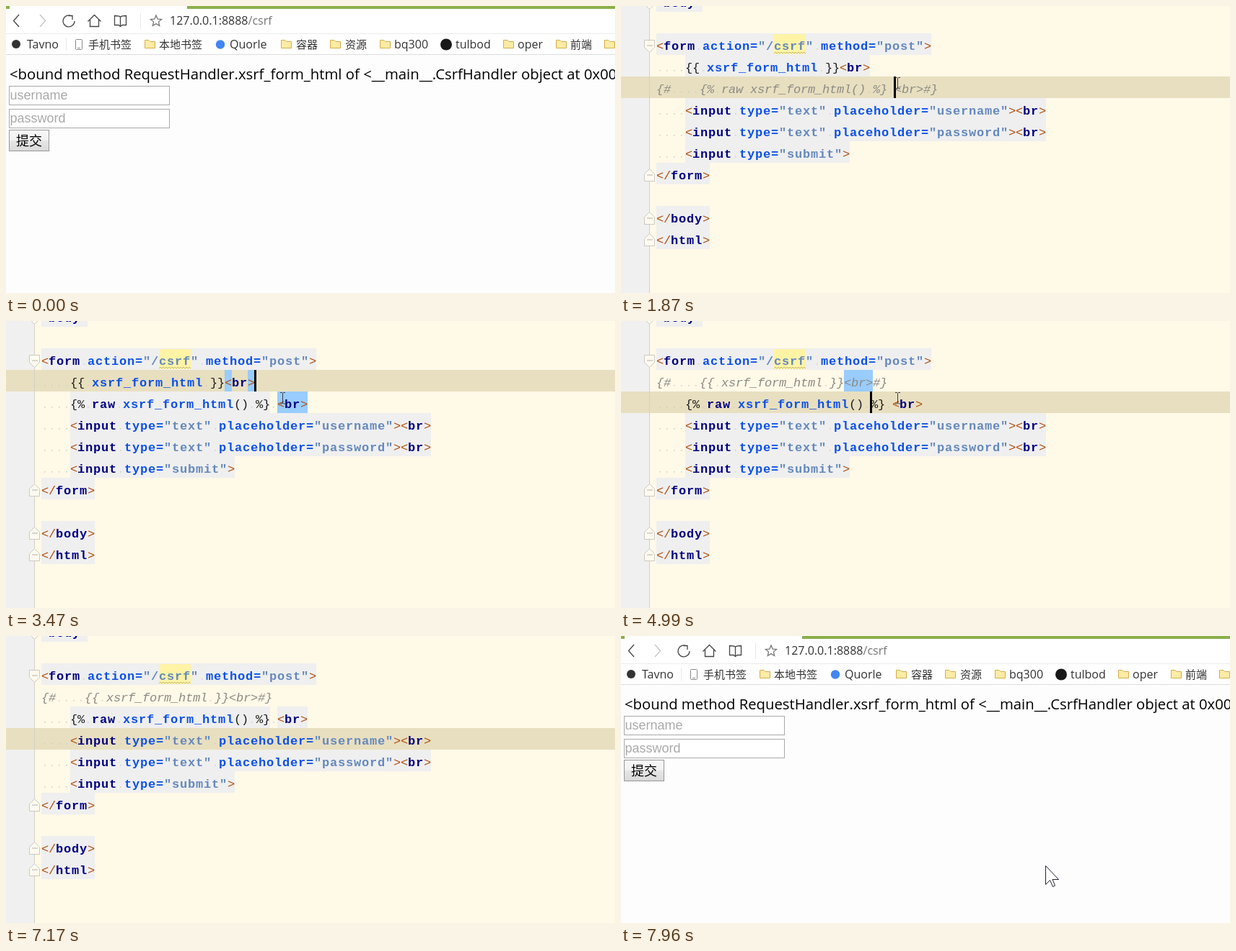
These frames come from a looping animation (844 px wide and 399 px high, 8000 ms). An HTML page:

```html
<!DOCTYPE html>
<html lang="zh">
<head>
<meta charset="utf-8">
<title>CSRF form</title>
<style>
  html, body { margin: 0; width: 100%; height: 100%; overflow: hidden; background: #fdfdfd; }
  svg { display: block; width: 844px; height: 399px; }
  text { white-space: pre; }
  .code { font: 17px "Liberation Mono", monospace; letter-spacing: -.2px; }
  .bold { font-weight: 700; letter-spacing: .8px; }
  .note { font-style: italic; }
  .ui { font: 16px "Open Sans", "Noto Sans CJK SC", "Noto Sans CJK", sans-serif; fill: #333; }
  .cjk { font: 15px "Noto Sans CJK SC", "Noto Sans CJK", sans-serif; fill: #333; }
  .page { font: 20.3px "Open Sans", sans-serif; }
  .hint { font: 18px "Liberation Sans", sans-serif; fill: #a9a9a9; }
  .icon { fill: none; stroke: #444; stroke-width: 1.3; }
</style>
</head>
<body>
<svg id="stage" viewBox="0 0 844 399">
  <defs>
    <linearGradient id="button" x2="0" y2="1">
      <stop offset="0" stop-color="#f8f8f8"/><stop offset=".48" stop-color="#f1f1f1"/>
      <stop offset=".5" stop-color="#e6e6e6"/><stop offset="1" stop-color="#dadada"/>
    </linearGradient>
  </defs>
</svg>
<script>
const LOOP = 8000, ROW = 30, LEFT = 49, TOP = 38;
const stage = document.getElementById('stage');

function add(parent, name, attrs = {}, content = '') {
  const el = document.createElementNS('http://www.w3.org/2000/svg', name);
  for (const key in attrs) el.setAttribute(key, attrs[key]);
  el.textContent = content;
  return parent.appendChild(el);
}
const group = parent => add(parent, 'g');
const rect = (parent, x, y, width, height, fill, more) =>
  add(parent, 'rect', { x, y, width, height, fill, ...more });
const path = (parent, d, more) => add(parent, 'path', { d, ...more });
const label = (parent, x, y, style, content, more) =>
  add(parent, 'text', { x, y, class: style, ...more }, content);
const dot = (parent, cx, cy, r, fill) => add(parent, 'circle', { cx, cy, r, fill });

// Hard steps: each [time, styles] holds until the next one.
function hold(el, table) {
  const frames = table.map(([time, style]) => ({ offset: time / LOOP, easing: 'steps(1)', ...style }));
  frames.push({ ...frames[frames.length - 1], offset: 1 });
  el.animate(frames, { duration: LOOP, iterations: Infinity });
}
// Times alternate between on and off.
function show(el, ...times) {
  hold(el, [[0, { opacity: 0 }], ...times.map((t, i) => [t, { opacity: i % 2 ? 0 : 1 }])]);
}
function place(el, ...stops) {
  hold(el, [[0, { transform: 'translate(0px, 0px)' }],
    ...stops.map(([t, x, y]) => [t, { transform: `translate(${x}px, ${y}px)` }])]);
}

// Browser
const web = group(stage);
rect(web, 0, 0, 844, 399, '#fdfdfd');
rect(web, 0, 0, 844, 68, '#fff');
rect(web, 0, 0, 5, 4, '#8bb04c');
rect(web, 251, 0, 593, 4, '#8bb04c');
rect(web, 0, 38, 844, 1, '#ebebeb');
rect(web, 0, 67, 844, 1, '#dcdcdc');
rect(web, 186, 10, 1, 22, '#e8e8e8');
rect(web, 83, 45, 1, 17, '#e8e8e8');
const icon = (d, more) => path(web, d, { class: 'icon', ...more });
icon('M18 12 L10.5 20.5 L18 29');
icon('M47 12 L54.500 20.500 L47 29', { style: 'stroke:#c4c4c4' });
icon('M91 14 A8 8 0 1 0 95 21 M86.500 13.500 H92 V19');
icon('M113.500 21.500 L122.500 12.500 L131.500 21.500 M116.500 19 V28.500 H128.500 V19');
icon('M158.500 15 Q156 13.500 150.500 13.500 V26.500 H156 L158.500 28.500 L161 26.500 H166.500 V13.500 Q161 13.500 158.500 15 V28');
const star = Array.from({ length: 10 }, (_, i) => {
  const a = i * Math.PI / 5, r = i % 2 ? 3.6 : 8;
  return `${208 + r * Math.sin(a)} ${21 - r * Math.cos(a)}`;
});
icon(`M${star.join('L')}Z`, { style: 'stroke:#777' });
const url = label(web, 227, 26, 'ui', '127.0.0.1:8888');
add(url, 'tspan', { fill: '#757575' }, '/csrf');

dot(web, 14, 53, 6, '#333');
rect(web, 96.5, 46.5, 9, 14, '#fff', { stroke: '#888', rx: 1 });
rect(web, 99, 58, 4, 1, '#888');
for (const x of [192, 381, 449, 518, 689, 762, 829])
  path(web, `M${x + .5} 58.500 V47.500 H${x + 6} L${x + 8} 49.500 H${x + 14.5} V58.500Z`,
    { fill: '#fdeba6', stroke: '#d5ae4c' });
dot(web, 297, 53.5, 6.2, '#4285f4');
dot(web, 610, 53.5, 8, '#181818');
for (const [x, name] of [[29, 'Tavno'], [310, 'Quorle'], [538, 'bq300'], [623, 'tulbod'], [709, 'oper']])
  label(web, x, 59, 'ui', name);
for (const [x, name] of [[114, '手机书签'], [212, '本地书签'], [402, '容器'], [470, '资源'], [782, '前端']])
  label(web, x, 59, 'cjk', name);

label(web, 5, 102, 'page', '<bound method RequestHandler.xsrf_form_html of <__main__.CsrfHandler object at 0x00000000');
for (const [y, hint] of [[111, 'username'], [143, 'password']]) {
  rect(web, 4.5, y + .5, 222, 26, '#fff', { stroke: '#a9a9a9' });
  label(web, 5.5, y + 19, 'hint', hint);
}
rect(web, 4.5, 172.5, 55, 29, 'url(#button)', { stroke: '#979797' });
label(web, 14, 194, 'cjk', '提交', { style: 'font-size:18px;fill:#000' });

const arrow = group(web);
path(arrow, 'M.5 .5 V26.500 L6.500 20.500 L10.500 29.500 L13.500 28 L10 19.500 H18.500Z',
  { fill: '#fff', stroke: '#223' });
show(arrow, 7820);
place(arrow, [7820, 357, 244], [7960, 588, 319]);

// Editor
const editor = group(stage);
show(editor, 700, 7570);
rect(editor, 0, 0, 844, 399, '#fff9e8');
rect(editor, 0, 0, 39, 399, '#f0f0f0');
const shades = group(editor), bands = group(editor), marks = group(editor), words = group(editor);
const rowY = row => TOP + row * ROW;

const INK = {
  p: ['#b05010', ''], t: ['#000080', 'bold'], a: ['#0a50e8', 'bold'], v: ['#6488bd', 'bold'],
  x: ['#1c1c1c', ''], c: ['#8c8a84', 'note']
};
// Tokens are split by "~"; the first letter picks the ink.
function line(row, source) {
  const g = group(words), shade = group(shades), y = rowY(row);
  let x = LEFT;
  source.split('~').forEach((token, index) => {
    const [fill, style] = INK[token[0]], content = token.slice(1);
    const step = style === 'bold' ? 11 : 10, width = content.length * step;
    const indent = index === 0 && !content.trim();
    if (token[0] !== 'c' && !indent) rect(shade, x, y, width, ROW, '#efefef');
    if (content.trim()) label(g, x, y + 23, `code ${style}`, content, { fill });
    [...content].forEach((ch, i) => {
      if (ch === ' ') rect(g, x + i * step + 4, y + 21, 1.5, 1.5, '#cfcbbd');
    });
    x += width;
  });
  return (...times) => { show(g, ...times); show(shade, ...times); };
}
const BR = 'p<~tbr~p>';
const field = name => `x    ~p<~tinput~p ~atype=~v"text"~p ~aplaceholder=~v"${name}"~p>~${BR}`;

line(-2, 'p<~tbody~p>');
line(0, 'p<~tform~p ~aaction=~v"/csrf"~p ~amethod=~v"post"~p>');
line(1, `x    ~x{{ ~axsrf_form_html~x }}~${BR}`)(700, 4990);
line(1, 'c{#    {{ xsrf_form_html }}<br>#}')(4990);
line(2, 'c{#    {% raw xsrf_form_html() %} <br>#}')(700, 2700);
line(2, `x    ~x{% ~traw~x ~axsrf_form_html~x() %}~c ~${BR}`)(2700);
line(3, field('username'));
line(4, field('password'));
line(5, 'x    ~p<~tinput~p ~atype=~v"submit"~p>');
line(6, 'p</~tform~p>');
line(8, 'p</~tbody~p>');
line(9, 'p</~thtml~p>');

// Caret row
const band = (row, ...times) => show(rect(bands, 0, rowY(row), 844, ROW, '#e8dfc0'), ...times);
band(1, 3470, 4990);
band(2, 700, 830, 1870, 2700, 2980, 3470, 4990, 5260);
band(3, 2700, 2980, 5260);

// Word highlight, with a wavy underline
rect(marks, 212, 39, 44, 28, '#fff3a6');
path(marks, 'M212 66' + 'l2 -2l2 2'.repeat(11), { fill: 'none', stroke: '#c4b878' });

// Matching tag highlight
const match = (x, row, width, ...times) =>
  show(rect(marks, x, rowY(row), width, ROW, '#99ccff'), ...times);
match(376, 2, 10, 2980, 3750);
match(386, 2, 22, 3320, 3750);
match(408, 2, 10, 2980, 3750);
match(303, 1, 10, 3470, 4990);
match(313, 1, 22, 3750, 4990);
match(335, 1, 10, 3470, 4990);
match(309, 1, 40, 4990, 5380);

// Gutter and fold markers
rect(editor, 39, 0, 1, 399, '#d2d0c8');
function fold(row, dir) {
  const y = rowY(row) + 17.5;
  path(editor, `M32.500 ${y - 8 * dir} H46.500 V${y + 2 * dir} L39.500 ${y + 9 * dir} L32.500 ${y + 2 * dir}Z`,
    { fill: '#fffaf0', stroke: '#cbc9c0' });
  rect(editor, 36, y - 1, 8, 1, '#b5b3aa');
}
fold(-2, 1);
fold(0, 1);
[6, 8, 9].forEach(row => fold(row, -1));

// Intention bulb
const bulb = group(editor);
dot(bulb, 6, 6.5, 5.5, '#f6cf55').setAttribute('stroke', '#c9a035');
rect(bulb, 3, 12, 6, 6, '#9a9a9a');
rect(bulb, 4, 18, 4, 2, '#777');
show(bulb, 2550, 2700, 4150, 4990);
place(bulb, [2550, 59, 78], [4150, 59, 70]);

const caret = (x, row, ...times) => show(rect(editor, x - 1, rowY(row), 3, ROW, '#000'), ...times);
caret(379, 2, 1870, 2700);
caret(383, 3, 2700, 2980);
caret(376, 2, 2980, 3470);
caret(345, 1, 3470, 4310, 4710, 4990);
caret(346, 2, 4990, 5260);
caret(350, 3, 5260, 6090, 6640, 7170);

const beam = group(editor);
path(beam, 'M0 .5 H2.500 L3.500 1.500 L4.500 .5 H7 M3.500 1 V15.500 M0 16 H2.500 L3.500 15 L4.500 16 H7',
  { fill: 'none', stroke: '#3c3c44' });
show(beam, 990, 6220);
place(beam, [990, 276, 39], [1140, 300, 121], [1290, 330, 141], [1420, 356, 133],
  [1570, 380, 100], [1720, 380, 99]);
</script>
</body>
</html>
```
